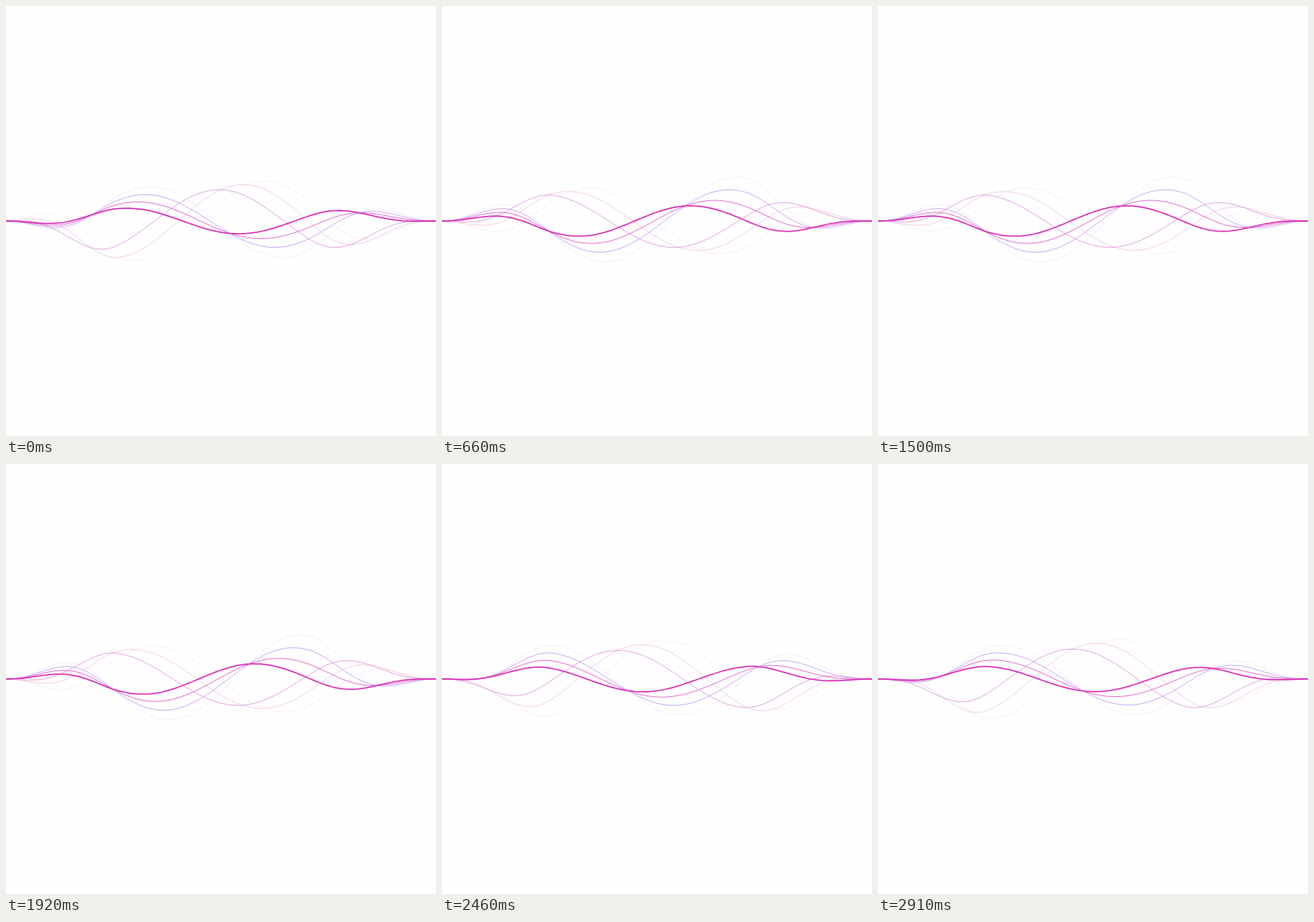
These frames come from a looping animation (500 px wide and 500 px high, 2940 ms). An HTML page:

```html
<!DOCTYPE html>
<html lang="en">
<head>
<meta charset="utf-8">
<title>Wave</title>
<style>
html, body { margin: 0; width: 100%; height: 100%; overflow: hidden; background: #fefefe; }
svg { display: block; width: 100%; height: 100%; }
</style>
</head>
<body>
<svg viewBox="0 0 500 500" fill="none" stroke-linejoin="round"></svg>
<script>
const STEP = 30, PERIOD = 14, SIZE = 500, MID = SIZE / 2;

// delay: step at which a crest passes the middle; speed: pixels per step
const calm = { height: 16.5, delay: 5.9, speed: 18.6 };
const lively = { height: 34, delay: 4.1, speed: 21.5 };

// blend: 0 is the calm wave, 1 the lively one, beyond that exaggerated
const lines = [
  { color: "#f6eef6", width: .8, blend: 1, shift: 6.5, scale: 1.23 },
  { color: "#ededfd", width: .8, blend: 1.5 },
  { color: "#f2cbe4", width: .8, blend: 1, shift: 5.3, scale: 1.13 },
  { color: "#df9edb", width: .8, blend: 1, shift: 4 },
  { color: "#c6a2f4", width: .8, blend: 1 },
  { color: "#e172cd", width: .9, blend: .5 },
  { color: "#d930b6", width: 1.5, blend: 0 }
];

const cycle = steps => Math.cos(2 * Math.PI * steps / PERIOD);
const mix = (a, b, k) => a + (b - a) * k;
const smooth = t => {
  t = Math.min(t, 1);
  return t * t * (3 - 2 * t);
};

const taper = x => smooth(x / 130) * smooth((SIZE - x) / 147);
const swell = step => 1 - .11 * cycle(step - 13);
const ripple = (wave, x, step) =>
  wave.height * cycle(step - wave.delay - (x - MID) / wave.speed);

const svg = document.querySelector("svg");
for (const line of lines) {
  line.path = document.createElementNS(svg.namespaceURI, "path");
  line.path.setAttribute("stroke", line.color);
  line.path.setAttribute("stroke-width", line.width);
  svg.append(line.path);
}

function draw(step) {
  for (const { path, blend, shift = 0, scale = 1 } of lines) {
    const at = step + shift;
    const points = [];
    for (let x = 0; x <= SIZE; x += 4) {
      const rise = mix(ripple(calm, x, at), ripple(lively, x, at), blend);
      const y = MID - scale * swell(at) * taper(x) * rise;
      points.push(x + " " + y.toFixed(2));
    }
    path.setAttribute("d", "M" + points.join("L"));
  }
}

const start = performance.now();
function tick() {
  const time = Math.max(0, performance.now() - start);
  draw(Math.floor(time / STEP) % PERIOD);
  requestAnimationFrame(tick);
}
tick();
</script>
</body>
</html>
```
